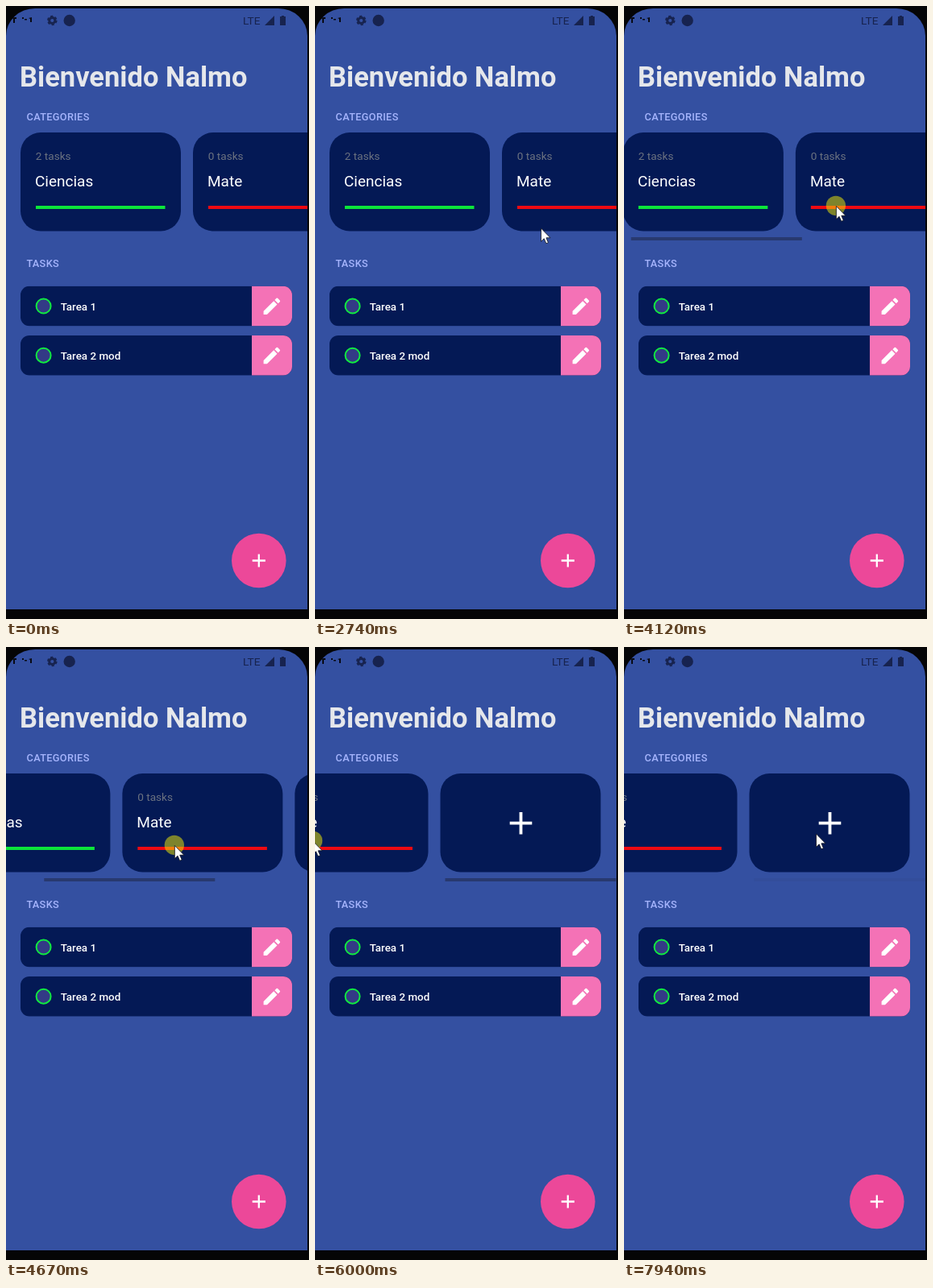
These frames come from a looping animation (376x761 px, 8000 ms). An HTML page:

```html
<!DOCTYPE html>
<html lang="es">
<head>
<meta charset="utf-8">
<title>Tareas</title>
<style>
  html, body { margin: 0; width: 100%; height: 100%; overflow: hidden; background: #050506; }
  svg { display: block; width: 376px; height: 761px; }
  text { font-family: Roboto, sans-serif; fill: #fff; }
  .title { font-size: 34.5px; font-weight: 700; fill: #e5e7eb; }
  .label { font-size: 12.75px; font-weight: 500; letter-spacing: .32px; fill: #a5b4fc; }
  .count { font-size: 13.6px; fill: #6b7280; }
  .name { font-size: 19px; }
  .task { font-size: 13.4px; font-weight: 500; }
  .status { fill: #17234f; }
  .status text { font-size: 13.7px; fill: inherit; }
</style>
</head>
<body>
<svg viewBox="0 0 376 761">
  <defs>
    <clipPath id="screen"><path d="M0 749V37A36 34 0 0 1 36 3H338A36 34 0 0 1 374 37V749Z"/></clipPath>
    <clipPath id="row"><rect x="18" width="337" height="49.5" rx="11"/></clipPath>
    <path id="pencil" fill="#fff" d="M3 17.25V21h3.75L17.81 9.94l-3.75-3.75L3 17.25zM20.71 7.04a1 1 0 0 0 0-1.41l-2.34-2.34a1 1 0 0 0-1.41 0l-1.83 1.83 3.75 3.75 1.83-1.83z"/>
  </defs>
  <rect width="376" height="761" fill="#050506"/>
  <g clip-path="url(#screen)">
    <rect width="374" height="749" fill="#3450a1"/>
    <g class="status">
      <path fill="#080a14" d="M8 14h5v2h-2v5H9v-5H8zM20 14h2v2h-2zM23 16h3v1.5h-3zM28 15l4-1v6h-2v-4z"/>
      <g fill="none" stroke="#17234f">
        <circle cx="57.3" cy="18" r="3.6" stroke-width="3"/>
        <circle cx="57.3" cy="18" r="5.4" stroke-width="1.8" stroke-dasharray="3.2 2.45"/>
      </g>
      <circle cx="78.7" cy="18" r="7.2"/>
      <text x="294" y="22.5">LTE</text>
      <path d="M333 12V24H321ZM342 12h3v1h2v11h-7V13h2z"/>
    </g>
    <text class="title" x="17" y="100">Bienvenido Nalmo</text>
    <text class="label" x="25.5" y="142">CATEGORIES</text>
    <g id="cards"></g>
    <rect id="thumb" y="287" width="212" height="4" fill="#28396f"/>
    <text class="label" x="25.5" y="324.4">TASKS</text>
    <g id="tasks"></g>
    <circle cx="313.8" cy="688.5" r="33.8" fill="#ec4899"/>
    <path d="M305.7 688.5h16.2M313.8 680.4v16.2" stroke="#fff" stroke-width="2.3"/>
    <g id="pointer">
      <circle id="touch" r="12.2" fill="#f8f004" opacity=".5"/>
      <path d="M.5.5V16.8L4.2 13.3 6.8 19.3 9.4 18.2 6.9 12.3H12Z" fill="#fff" stroke="#10131c" stroke-width=".8"/>
    </g>
  </g>
</svg>
<script>
const LOOP = 8000, APPEAR = 660, PRESS = 3750, RELEASE = 6650;
const VIEW = 374, CONTENT = 664.5;
const $ = id => document.getElementById(id);
const clamp01 = v => Math.min(1, Math.max(0, v));

const card = (index, content) => `
  <g transform="translate(${18 + 214 * index} 157)">
    <rect width="199" height="122.5" rx="25" fill="#041955"/>${content}
  </g>`;

const category = (index, count, name, color) => card(index, `
  <text class="count" x="18.8" y="34">${count} tasks</text>
  <text class="name" x="18" y="66.7">${name}</text>
  <rect x="19" y="91" width="160.5" height="4" fill="${color}"/>`);

const task = (index, name) => `
  <g transform="translate(0 ${347.7 + 61.2 * index})">
    <g clip-path="url(#row)">
      <rect width="374" height="50" fill="#041955"/>
      <rect x="305" width="50" height="50" fill="#f472b6"/>
    </g>
    <circle cx="46.6" cy="24.8" r="9" fill="#333a86" stroke="#10ea40" stroke-width="2"/>
    <text class="task" x="67.8" y="30.2">${name}</text>
    <use href="#pencil" transform="translate(316.2 11.4) scale(1.14)"/>
  </g>`;

$("cards").innerHTML =
  category(0, 2, "Ciencias", "#0ce53a") +
  category(1, 0, "Mate", "#ee0a12") +
  card(2, '<path d="M86.2 61.7h27.6M100 47.9v27.6" stroke="#fff" stroke-width="3.8"/>');
$("tasks").innerHTML = ["Tarea 1", "Tarea 2 mod"].map((name, i) => task(i, name)).join("");

// Waypoints: time, then position.
const pointerPath = [
  [APPEAR, 279, 734], [1250, 131, 410], [1500, 142, 337], [2740, 280, 275.5],
  [3500, 314, 255], [4120, 263, 248], [4670, 209, 246], [6000, -3, 240.5],
  [RELEASE, -3, 240.5], [7300, 232, 245], [7690, 238, 231.5]
];
const scrollPath = [
  [4000, 0], [4120, 19], [4670, 87.5], [5270, 163.7], [6000, CONTENT - VIEW]
];

function along(path, t) {
  const i = Math.max(1, path.findIndex(point => point[0] > t));
  const [from, to] = t >= path.at(-1)[0] ? path.slice(-2) : [path[i - 1], path[i]];
  const k = clamp01((t - from[0]) / (to[0] - from[0]));
  return from.slice(1).map((v, axis) => v + (to[axis + 1] - v) * k);
}

function draw(t) {
  const [scroll] = along(scrollPath, t);
  const fadeIn = clamp01((t - 4020) / 80);
  const fadeOut = 1 - .88 * clamp01((t - 6950) / 450);

  $("cards").setAttribute("transform", `translate(${-scroll} 0)`);
  $("thumb").setAttribute("x", scroll * VIEW / CONTENT - 2);
  $("thumb").setAttribute("opacity", fadeIn * fadeOut);
  $("pointer").setAttribute("transform", `translate(${along(pointerPath, t).join(" ")})`);
  $("pointer").setAttribute("visibility", t < APPEAR ? "hidden" : "visible");
  $("touch").setAttribute("display", t >= PRESS && t < RELEASE ? "inline" : "none");
}

const start = performance.now();
function tick() {
  draw((performance.now() - start) % LOOP);
  requestAnimationFrame(tick);
}
tick();
</script>
</body>
</html>
```
